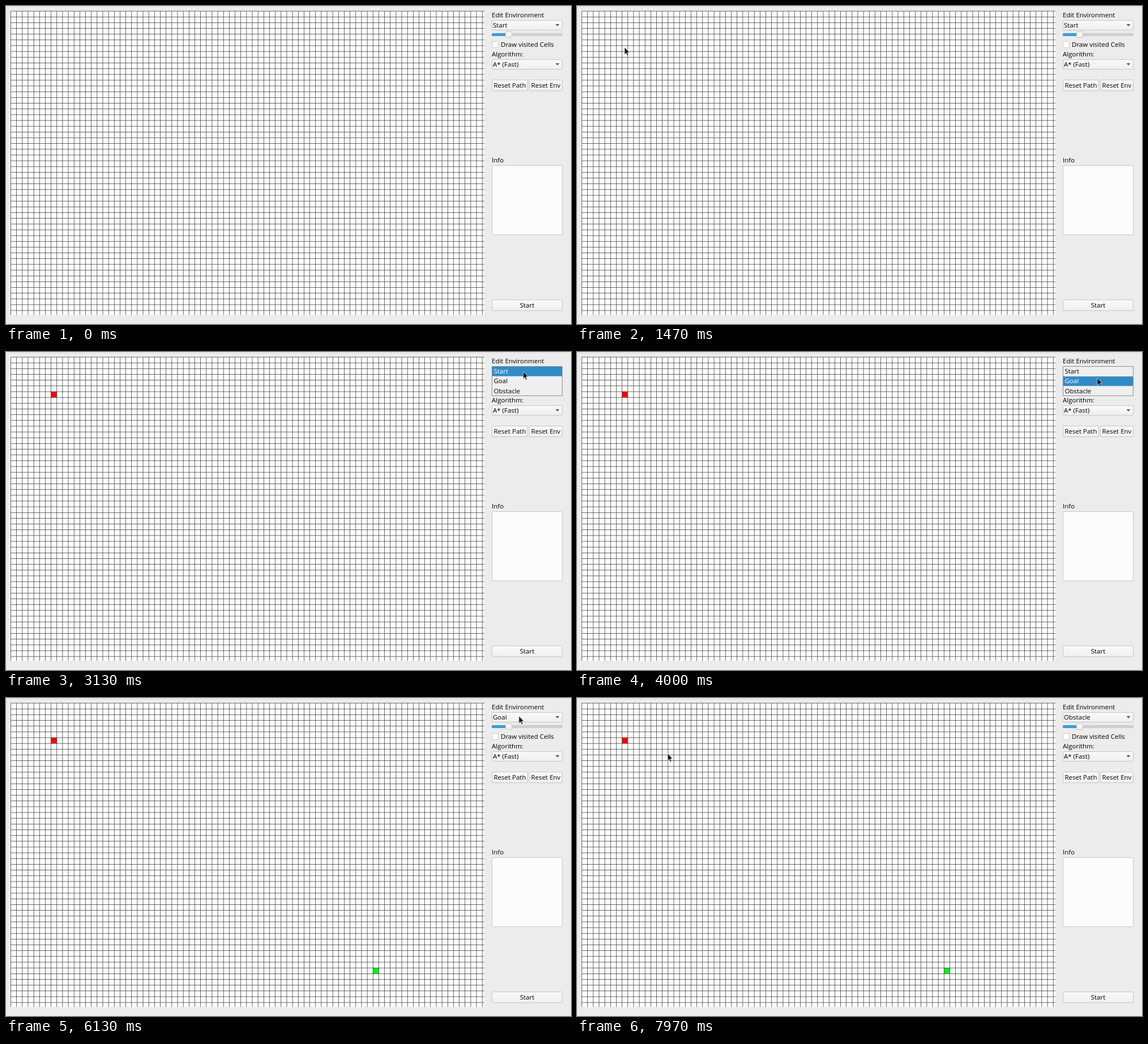
Animation, 998 px wide and 561 px high, one loop 8 s. Source, as an HTML page with a canvas:

```html
<!DOCTYPE html>
<html lang="en">
<head>
<meta charset="utf-8">
<title>Path planner</title>
<style>
  html, body { margin: 0; width: 100%; height: 100%; overflow: hidden; background: #ececec; }
  canvas { display: block; }
</style>
</head>
<body>
<canvas id="stage" width="998" height="561"></canvas>
<script>
const ctx = document.getElementById('stage').getContext('2d');
const LOOP = 8000, STEP = 1000 / 30;
// x and y are the centres of the first grid lines
const GRID = { x: 8.5, y: 9.05, right: 845, bottom: 545, pitch: 10.155, line: 0.66 };
const LINE_COLOR = '#202020', TEXT_COLOR = '#000';
const MODES = ['Start', 'Goal', 'Obstacle'];
const ROW = 17.2;
const POINTER_SHOWN = 300, START_PLACED = 1720, GOAL_PLACED = 5170;
const POPUPS = [
  { open: 2850, close: 4190, top: 25.5, current: 0 },
  { open: 6420, close: 7110, top: 8.5, current: 1 }
];

// Pointer path: time, x, y
const PATH = [
  [300, 1002, 150], [933, 253, 82], [1450, 84, 73], [1760, 84, 73],
  [2133, 605.5, 60.5], [2450, 912, 34], [3300, 914, 35], [3800, 919, 46],
  [4200, 919, 46], [4833, 656.5, 474], [5000, 653, 480], [5300, 653, 480],
  [5870, 903, 40], [6133, 906, 32], [6450, 906, 32], [6800, 910, 49],
  [7120, 910, 49], [7967, 160, 98], [8000, 154, 98]
];

const slope = (i, axis) => (PATH[i + 1][axis] - PATH[i][axis]) / (PATH[i + 1][0] - PATH[i][0]);

// Monotone tangent: flat at rests and turning points
function tangent(i, axis) {
  if (i === 0) return slope(0, axis);
  if (i === PATH.length - 1) return slope(i - 1, axis);
  const a = slope(i - 1, axis), b = slope(i, axis);
  return a * b > 0 ? 2 * a * b / (a + b) : 0;
}

function pointerAt(t) {
  let i = 0;
  while (i < PATH.length - 2 && t >= PATH[i + 1][0]) i++;
  const span = PATH[i + 1][0] - PATH[i][0];
  const u = (t - PATH[i][0]) / span, v = 1 - u;
  return [1, 2].map(axis =>
    PATH[i][axis] * v * v * (1 + 2 * u) + PATH[i + 1][axis] * u * u * (3 - 2 * u) +
    span * u * v * (tangent(i, axis) * v - tangent(i + 1, axis) * u));
}

function rect(x, y, w, h, fill) {
  ctx.fillStyle = fill;
  ctx.fillRect(x, y, w, h);
}

function box(x, y, w, h, fill, border, radius = 1.5) {
  ctx.beginPath();
  ctx.roundRect(x, y, w, h, radius);
  ctx.fillStyle = fill;
  ctx.fill();
  ctx.strokeStyle = border;
  ctx.lineWidth = 1;
  ctx.stroke();
}

function raised(x, y, w, h) {
  const shade = ctx.createLinearGradient(0, y, 0, y + h);
  shade.addColorStop(0, '#fafafa');
  shade.addColorStop(1, '#efefef');
  box(x, y, w, h, shade, '#c6c6c6');
}

function text(label, x, centerY, color = TEXT_COLOR, align = 'left') {
  ctx.font = '500 11.5px "Open Sans", "Noto Sans", sans-serif';
  ctx.textAlign = align;
  ctx.fillStyle = color;
  ctx.fillText(label, x, centerY + 4);
}

function polygon(points, fill) {
  ctx.beginPath();
  points.forEach(([x, y]) => ctx.lineTo(x, y));
  ctx.closePath();
  ctx.fillStyle = fill;
  ctx.fill();
}

function button(label, x, y, w, h) {
  raised(x, y, w, h);
  text(label, x + w / 2, y + h / 2 + 0.3, TEXT_COLOR, 'center');
}

function combo(label, y) {
  raised(858.5, y, 124, 17);
  text(label, 860, y + 8.5);
  polygon([[970.5, y + 6.5], [977.5, y + 6.5], [974, y + 10.3]], '#555');
}

function cell(col, row, color) {
  const { x, y, pitch } = GRID;
  rect(x + col * pitch, y + row * pitch, pitch, pitch, color);
}

function drawGrid(t) {
  const { x, y, right, bottom, pitch, line } = GRID;
  rect(8, 9, right - 8, bottom - 9, '#fdfdfd');
  if (t >= START_PLACED) cell(7, 6, '#ff0000');
  if (t >= GOAL_PLACED) cell(63, 46, '#00fa08');
  for (let p = x; p < right; p += pitch) rect(p - line / 2, y, line, bottom - y, LINE_COLOR);
  for (let p = y; p < bottom; p += pitch) rect(x, p - line / 2, right - x, line, LINE_COLOR);
}

function drawPanel(t) {
  const mode = POPUPS.filter(p => t >= p.close).length;
  text('Edit Environment', 858, 16);
  combo(MODES[mode], 25.5);

  box(858.5, 48.5, 124, 4, '#d2d2d2', '#c6c6c6');
  box(858.5, 48.5, 26, 4, '#3ba0dc', '#3590c8');
  raised(882.5, 45.5, 11, 10);

  box(858.5, 62.5, 11, 11, '#fdfdfd', '#cbcbcb');
  text('Draw visited Cells', 874, 67.8);
  text('Algorithm:', 858, 85);
  combo('A* (Fast)', 94.5);

  button('Reset Path', 858.5, 130.5, 63, 19);
  button('Reset Env', 924.5, 130.5, 58, 19);
  text('Info', 858, 272);
  box(858.5, 281.5, 124, 122, '#fcfcfc', '#c8c8c8');
  button('Start', 858.5, 518.5, 124, 19);
}

function drawPopup({ top, current }, pointerY) {
  const hovered = Math.max(current, Math.min(2, Math.floor((pointerY - top) / ROW)));
  box(858.5, top, 124, 3 * ROW, '#efefef', '#8c8c8c', 0);
  MODES.forEach((label, i) => {
    const y = top + i * ROW;
    if (i === hovered) rect(859, y + 0.4, 123, ROW - 0.4, '#308cc6');
    text(label, 861.5, y + ROW / 2, i === hovered ? '#fff' : TEXT_COLOR);
  });
}

function drawPointer([x, y]) {
  ctx.save();
  ctx.translate(x, y);
  polygon([[0, 0], [0, 12.5], [2.8, 9.9], [4.9, 14.6], [6.9, 13.7], [4.9, 9.2], [8.6, 9]], '#151515');
  ctx.strokeStyle = 'rgba(235, 235, 235, 0.85)';
  ctx.lineWidth = 0.8;
  ctx.stroke();
  ctx.restore();
}

function draw(t) {
  rect(0, 0, 998, 561, '#ececec');
  rect(0, 1, 998, 1, '#dedede');
  drawGrid(t);
  drawPanel(t);
  const pointer = pointerAt(t);
  const popup = POPUPS.find(p => t >= p.open && t < p.close);
  if (popup) drawPopup(popup, pointer[1]);
  if (t >= POINTER_SHOWN) drawPointer(pointer);
}

const began = performance.now();
function tick() {
  const t = (performance.now() - began) % LOOP;
  draw(Math.floor((t + 5) / STEP) * STEP);
  requestAnimationFrame(tick);
}
tick();
</script>
</body>
</html>
```
